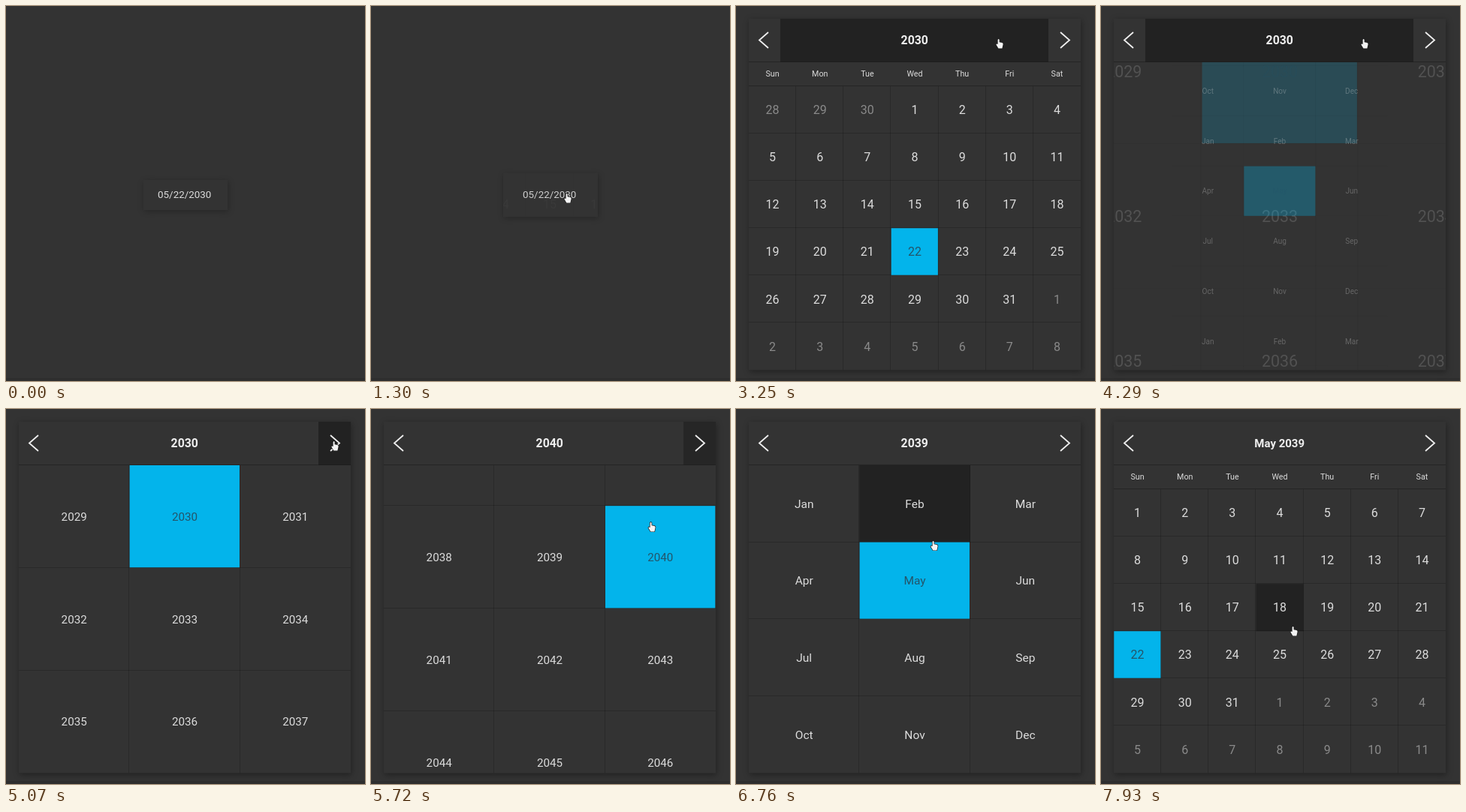
Animation, 478 px wide and 500 px high, one loop 8000 ms. Source, as an HTML page with a canvas:

```html
<!DOCTYPE html>
<html lang="en">
<head>
<meta charset="utf-8">
<title>Date picker</title>
<style>
  html, body { margin: 0; width: 100%; height: 100%; overflow: hidden; background: #333; }
  canvas { display: block; }
</style>
</head>
<body>
<canvas id="stage" width="478" height="500"></canvas>
<script>
const ctx = document.getElementById('stage').getContext('2d');
const LOOP = 8000, TICK = 130;
const BG = '#333', HOVER = '#222', BLUE = '#03b4eb', ON_BLUE = '#24556a';
const INK = '#dcdcdc', DIM = '#8a8a8a', LINE = 'rgba(0,0,0,.19)';
const MONTHS = 'Jan Feb Mar Apr May Jun Jul Aug Sep Oct Nov Dec'.split(' ');
const WEEK = 'Sun Mon Tue Wed Thu Fri Sat'.split(' ');
const LEFT = 17, WIDTH = 442, TOP = 17, BODY = 75, BOTTOM = 485.5;
const FIELD = [183, 232, 112, 40];
const PANEL = [LEFT, TOP, WIDTH, BOTTOM - TOP];

// key moments
const OPEN = 1240, TO_MONTHS = 3250, TO_YEARS = 4160, PAGE = 5330, PICK_YEAR = 6240, PICK_MONTH = 7410;

const clamp = u => Math.max(0, Math.min(1, u));
const lerp = (a, b, u) => a + (b - a) * u;
const ease = (t, start, len) => {
  const u = clamp((t - start) / len);
  return u * u * (3 - 2 * u);
};
const fade = (t, on, off, len = 180) => clamp((t - on) / len) - clamp((t - off) / len);
const yearAt = t => t < PAGE ? 2030 : t < PICK_YEAR ? 2040 : 2039;

const views = {
  days: {
    cols: 7, rows: 6, top: 107, size: 16,
    cell(r, c, t) {
      const y = yearAt(t), first = new Date(y, 4, 1).getDay();
      const d = new Date(y, 4, 1 - first + r * 7 + c), own = d.getMonth() === 4;
      return [d.getDate(), !own, own && d.getDate() === 22];
    }
  },
  months: {
    cols: 3, rows: 4, top: BODY, size: 15.5,
    cell(r, c) {
      const i = r * 3 + c;
      return [MONTHS[(i + 24) % 12], false, i === 4];
    }
  },
  years: {
    cols: 3, rows: 3, top: BODY, size: 15.2,
    scroll: t => 3 * ease(t, PAGE, 505),
    cell(r, c, t) {
      const y = 2029 + r * 3 + c;
      return [y, false, y === yearAt(t)];
    }
  }
};

// view, row, column, on, off
const hovers = [
  ['years', 3, 1, 5930, 6300],
  ['months', 0, 1, 6400, 6820],
  ['days', 2, 3, 7730, 9000]
];

// start, from, to, zoom direction
const changes = [
  [TO_MONTHS, 'days', 'months', -1],
  [TO_YEARS, 'months', 'years', -1],
  [PICK_YEAR, 'years', 'months', 1],
  [PICK_MONTH, 'months', 'days', 1]
];

// time, x, y of the pointer
const path = [
  [130, 438, 474], [780, 262, 256], [1500, 262, 256], [2080, 316, 33],
  [2600, 351, 50], [4500, 351, 50], [4940, 438, 49], [5400, 438, 49],
  [5720, 374, 157], [6110, 264, 182], [6760, 264, 182], [7020, 260, 236],
  [7500, 260, 236], [7930, 257, 296]
];

function rect(x, y, w, h, color) {
  ctx.fillStyle = color;
  ctx.fillRect(x, y, w, h);
}

function text(str, x, y, size, color, weight = 400) {
  ctx.font = `${weight} ${size}px Roboto, "Open Sans", sans-serif`;
  ctx.textAlign = 'center';
  ctx.fillStyle = color;
  ctx.fillText(str, x, y + size * 0.355);
}

function clip(x, y, w, h) {
  ctx.beginPath();
  ctx.rect(x, y, w, h);
  ctx.clip();
}

function drawView(name, t, scale, alpha) {
  if (alpha <= 0) return;
  const v = views[name], h = BOTTOM - v.top;
  const cw = WIDTH / v.cols, ch = h / v.rows;
  const shift = v.scroll ? v.scroll(t) : 0;
  const cx = LEFT + WIDTH / 2, cy = v.top + h / 2;
  const base = ctx.globalAlpha;
  ctx.save();
  ctx.globalAlpha = base * alpha;
  if (name === 'days') {
    WEEK.forEach((d, i) => text(d, LEFT + cw * (i + 0.5), 90.5, 10.7, INK));
    rect(LEFT, 106, WIDTH, 1, 'rgba(0,0,0,.28)');
  }
  clip(LEFT, v.top, WIDTH, h);
  ctx.translate(cx, cy);
  ctx.scale(scale, scale);
  ctx.translate(-cx, -cy);
  const pad = scale < 1 ? 3 : 0;
  for (let r = Math.floor(shift) - pad; r <= Math.ceil(shift) + v.rows + pad; r++) {
    for (let c = 0; c < v.cols; c++) {
      const x = LEFT + c * cw, y = v.top + (r - shift) * ch;
      const [label, dim, chosen] = v.cell(r, c, t);
      for (const [view, hr, hc, on, off] of hovers) {
        if (view !== name || hr !== r || hc !== c) continue;
        ctx.globalAlpha = base * alpha * fade(t, on, off);
        rect(x, y, cw, ch, HOVER);
        ctx.globalAlpha = base * alpha;
      }
      if (c < v.cols - 1) rect(Math.round(x + cw) - 1, y, 1, ch, LINE);
      rect(x, Math.round(y + ch) - 1, cw, 1, LINE);
      if (chosen) rect(x + 0.3, y, cw - 1, ch - 0.6, BLUE);
      text(label, x + cw / 2, y + ch / 2, v.size, chosen ? ON_BLUE : dim ? DIM : INK);
    }
  }
  ctx.restore();
}

function drawBody(t) {
  const now = changes.filter(c => t >= c[0]).pop();
  if (!now) return drawView('days', t, 1, 1);
  const [start, from, to, dir] = now;
  const leave = ease(t, start, 215), enter = ease(t, start, 480);
  drawView(to, t, 1 - dir * 0.5 * (1 - enter), enter);
  drawView(from, t, 1 + dir * 0.535 * leave, 1 - 1.07 * leave);
}

function chevron(x, dir) {
  ctx.beginPath();
  ctx.moveTo(x - dir * 6, 35);
  ctx.lineTo(x + dir * 6, 45.5);
  ctx.lineTo(x - dir * 6, 56);
  ctx.strokeStyle = '#eee';
  ctx.lineWidth = 1.8;
  ctx.stroke();
}

function drawHeader(t) {
  const base = ctx.globalAlpha;
  ctx.globalAlpha = base * fade(t, 2140, 4640);
  rect(59, TOP, 357, 57.5, HOVER);
  ctx.globalAlpha = base * fade(t, 4760, 5650, 250);
  rect(416, TOP, 43, 57.5, HOVER);
  ctx.globalAlpha = base;
  rect(LEFT, 74, WIDTH, 1, 'rgba(0,0,0,.28)');
  chevron(37, -1);
  chevron(438, 1);
  const full = t < TO_MONTHS || t >= PICK_MONTH;
  text((full ? 'May ' : '') + yearAt(t), 237.7, 45.5, full ? 15 : 15.8, '#eee', 700);
}

function drawBox(box, strength) {
  ctx.save();
  ctx.shadowColor = `rgba(0,0,0,${strength})`;
  ctx.shadowBlur = 8;
  ctx.shadowOffsetX = 1;
  ctx.shadowOffsetY = 2;
  rect(...box, BG);
  ctx.restore();
}

function drawPointer(t) {
  if (t < path[0][0]) return;
  const i = path.findIndex(p => p[0] > t);
  let [, x, y] = path[path.length - 1];
  if (i > 0) {
    const [t0, x0, y0] = path[i - 1], [t1, x1, y1] = path[i];
    const u = ease(t, t0, t1 - t0);
    x = lerp(x0, x1, u);
    y = lerp(y0, y1, u);
  }
  ctx.save();
  ctx.translate(x, y);
  ctx.beginPath();
  ctx.moveTo(-2.4, 1);
  ctx.lineTo(-2.4, -5);
  ctx.quadraticCurveTo(-1.4, -7, -0.4, -5);
  ctx.lineTo(-0.4, -1.8);
  ctx.lineTo(3.4, -1);
  ctx.quadraticCurveTo(4.8, -0.6, 4.6, 1);
  ctx.lineTo(3.4, 6.4);
  ctx.lineTo(-1.6, 6.4);
  ctx.lineTo(-4.6, 1.6);
  ctx.quadraticCurveTo(-4.4, -0.2, -2.4, 1);
  ctx.closePath();
  ctx.strokeStyle = '#1c1c1c';
  ctx.lineWidth = 1.4;
  ctx.stroke();
  ctx.fillStyle = '#f4f4f4';
  ctx.fill();
  ctx.restore();
}

function draw(t) {
  rect(0, 0, 478, 500, BG);
  rect(0, 496, 478, 4, '#2e2e2e');
  const grow = ease(t, OPEN, 480);
  const box = FIELD.map((v, i) => lerp(v, PANEL[i], grow));
  drawBox(box, lerp(0.25, 0.35, grow));
  ctx.globalAlpha = clamp(1 - grow * 2);
  text('05/22/2030', 237.7, 251, 13.4, INK);
  ctx.globalAlpha = grow;
  if (grow > 0) {
    ctx.save();
    clip(...box);
    drawBody(t);
    drawHeader(t);
    ctx.restore();
  }
  ctx.globalAlpha = 1;
  drawPointer(t);
}

function loop() {
  draw(Math.floor(performance.now() % LOOP / TICK) * TICK);
  requestAnimationFrame(loop);
}
loop();
</script>
</body>
</html>
```
